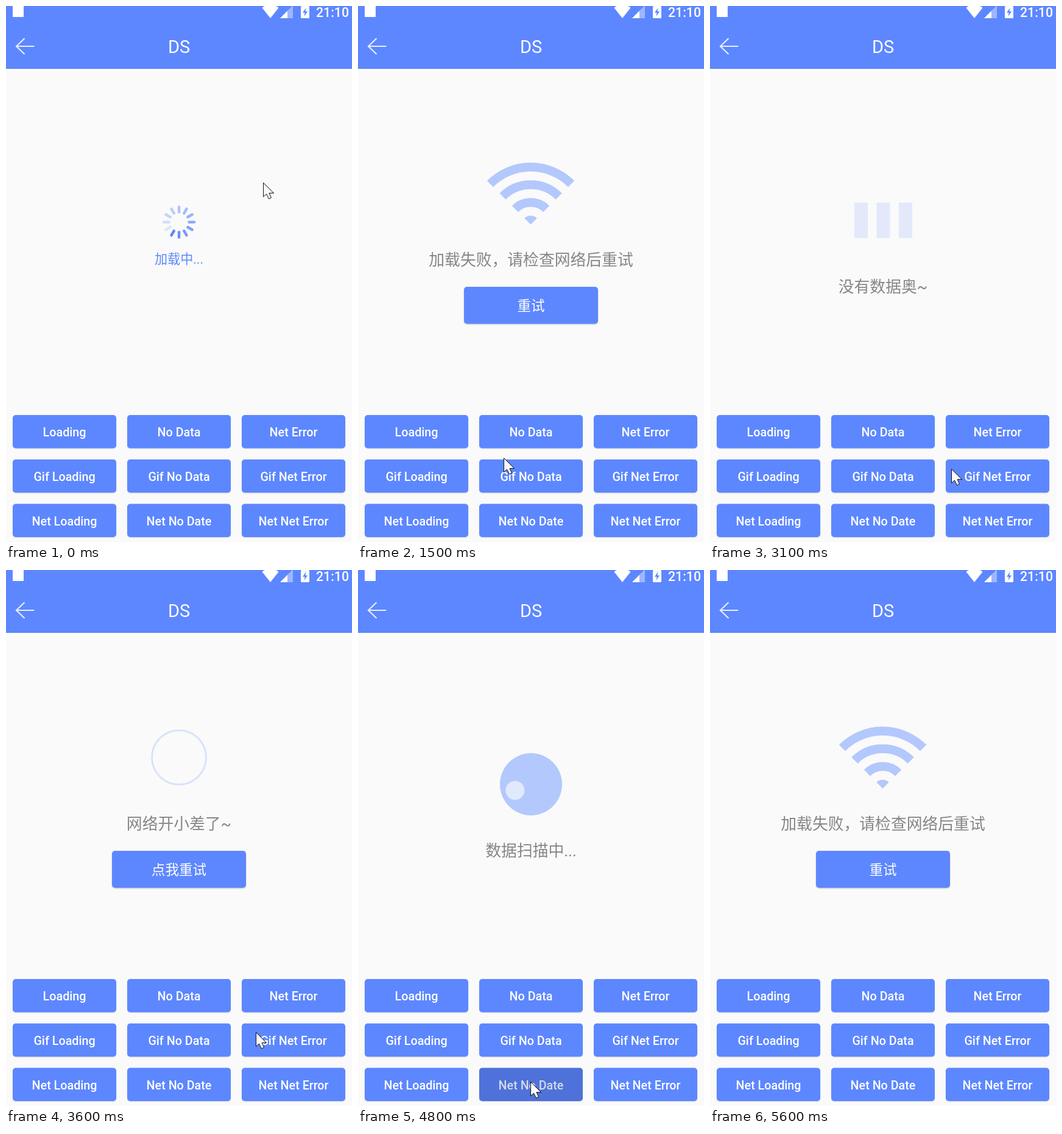
Recreate the animation shown at these times as an HTML page with a canvas. Size 568 by 878 pixels, loop 7300 ms.

```html
<!DOCTYPE html>
<html lang="zh">
<head>
<meta charset="utf-8">
<title>State screens</title>
<style>
html, body { margin: 0; width: 100%; height: 100%; overflow: hidden; background: #fafafa; }
canvas { display: block; }
</style>
</head>
<body>
<canvas id="stage" width="568" height="878"></canvas>
<script>
const ctx = document.getElementById('stage').getContext('2d');
const W = 568, H = 878, CX = 284;
const LOOP = 7300, STEP = 100, LAST = 5600;
const HOLD = 200, REST = 300;
const BLUE = '#5d87ff', PALE = '#b3c8fc', GREY = '#868686', BACK = '#fafafa';
const FONT = 'Roboto, "Noto Sans CJK SC", "Noto Sans CJK", sans-serif';
const TAU = Math.PI * 2;

// One scene per button: press time, pointer position, screen it opens.
const scenes = [
  { label: 'Loading', at: -REST, x: 422, y: 289, show: loading },
  { label: 'No Data', at: 400, x: 312, y: 703, show: noData },
  { label: 'Net Error', at: 1000, x: 414, y: 686, show: netError },
  { label: 'Gif Loading', at: 1900, x: 166, y: 763, show: () => message('拼命加载中...') },
  { label: 'Gif No Data', at: 2600, x: 298, y: 766, show: gifNoData },
  { label: 'Gif Net Error', at: 3300, x: 410, y: 757, show: gifNetError },
  { label: 'Net Loading', at: 4100, x: 152, y: 851, show: scanning },
  { label: 'Net No Date', at: 4800, x: 283, y: 838, show: noData },
  { label: 'Net Net Error', at: 5400, x: 455, y: 838, show: netError }
];

function trace(...points) {
  ctx.beginPath();
  points.forEach(([x, y]) => ctx.lineTo(x, y));
}

function poly(fill, ...points) {
  trace(...points);
  ctx.closePath();
  ctx.fillStyle = fill;
  ctx.fill();
}

function disc(x, y, r, fill) {
  ctx.beginPath();
  ctx.arc(x, y, r, 0, TAU);
  ctx.fillStyle = fill;
  ctx.fill();
}

function text(str, x, y, size, fill, weight = 400) {
  ctx.font = `${weight} ${size}px ${FONT}`;
  ctx.textAlign = 'center';
  ctx.fillStyle = fill;
  ctx.fillText(str, x, y);
}

function button(x, y, w, h, fill, shade) {
  ctx.save();
  ctx.shadowColor = `rgba(0,0,0,${shade})`;
  ctx.shadowBlur = 2;
  ctx.shadowOffsetY = 1;
  ctx.beginPath();
  ctx.roundRect(x, y, w, h, 5);
  ctx.fillStyle = fill;
  ctx.fill();
  ctx.restore();
}

function header() {
  ctx.fillStyle = BLUE;
  ctx.fillRect(0, 0, W, 103);
  ctx.fillStyle = '#fff';
  ctx.fillRect(11, 0, 18, 18);

  ctx.beginPath();
  ctx.moveTo(434, 20);
  ctx.lineTo(420.5, 3);
  ctx.quadraticCurveTo(434, -8, 447.5, 3);
  ctx.fill();

  poly('rgba(255,255,255,.4)', [450, 20], [471, 20], [471, -1]);
  poly('#fff', [450, 20], [462, 20], [462, 8]);

  ctx.beginPath();
  ctx.roundRect(484, 0, 14, 20, 1.5);
  ctx.fill();
  poly(BLUE, [492.5, 3], [487, 11], [490.5, 11], [489.5, 17], [495, 9], [491.5, 9]);
  text('21:10', 536, 18, 21.3, '#fff', 500);

  ctx.strokeStyle = '#e4ecff';
  ctx.lineWidth = 2.2;
  trace([30.5, 53], [17, 66], [30.5, 79]);
  ctx.moveTo(17, 66);
  ctx.lineTo(46.5, 66);
  ctx.stroke();
  text('DS', CX, 77, 29, '#fff');
}

function buttons(t) {
  scenes.forEach(({ label, at }, i) => {
    const x = 11 + (i % 3) * 188, y = 670 + Math.floor(i / 3) * 72.8;
    const down = t >= at && t < at + HOLD;
    button(x, y, 170, 54.4, down ? '#4e72d9' : BLUE, 0.12);
    text(label, x + 85, y + 35, 19.7, down ? '#d5daea' : '#fff', 500);
  });
}

function message(str, y = 469) {
  text(str, CX, y, 25.8, GREY);
}

function retry(str) {
  button(174, 460, 220, 60.5, BLUE, 0.25);
  text(str, CX, 499, 22.6, '#fff');
}

function loading(t) {
  const head = 7 + t / STEP;
  ctx.lineWidth = 4.4;
  ctx.lineCap = 'round';
  ctx.strokeStyle = BLUE;
  for (let i = 0; i < 12; i++) {
    const a = (head - i) * TAU / 12 - TAU / 4;
    const spoke = r => [CX + r * Math.cos(a), 354 + r * Math.sin(a)];
    ctx.globalAlpha = 1 - i * 0.075;
    trace(spoke(16.5), spoke(25));
    ctx.stroke();
  }
  ctx.globalAlpha = 1;
  ctx.lineCap = 'butt';
  text('加载中...', CX, 422, 21.1, BLUE);
}

function noData() {
  const l = 231.5, r = 335.5, top = 283.5, bottom = 419.5, k = 7;
  ctx.beginPath();
  ctx.moveTo(l + k, top);
  ctx.lineTo(303, top);
  ctx.lineTo(r, 317);
  ctx.arcTo(r, bottom, l, bottom, k);
  ctx.arcTo(l, bottom, l, top, k);
  ctx.arcTo(l, top, r, top, k);
  ctx.fillStyle = PALE;
  ctx.fill();
  message('暂无数据');
}

function netError() {
  const x = 283.5, y = 358, band = 14.4;
  ctx.strokeStyle = PALE;
  ctx.lineWidth = band;
  for (let i = 0; i < 4; i++) {
    ctx.beginPath();
    ctx.arc(x, y, band / 2 + i * 29, -TAU * 3 / 8, -TAU / 8);
    ctx.stroke();
  }
  message('加载失败，请检查网络后重试', 425);
  retry('重试');
}

function gifNoData(t) {
  ctx.fillStyle = BLUE;
  for (let i = 0; i < 3; i++) {
    const pulse = Math.max(0, 1 - Math.abs(t - 2800 - i * 50) / 200);
    const h = 58 + 16 * pulse;
    ctx.globalAlpha = 0.15 + 0.3 * pulse;
    ctx.fillRect(237 + i * 36.5, 351 - h / 2, 22, h);
  }
  ctx.globalAlpha = 1;
  message('没有数据奥~');
}

function gifNetError(t) {
  const p = (t + 200) % 1000 / 1000;
  ctx.globalAlpha = 1 - p * 0.7;
  ctx.strokeStyle = '#a9c2fc';
  ctx.lineWidth = 2.8;
  ctx.beginPath();
  ctx.arc(CX, 307, 47 * (1 - Math.pow(1 - p, 1.8)), 0, TAU);
  ctx.stroke();
  ctx.globalAlpha = 1;
  message('网络开小差了~', 425);
  retry('点我重试');
}

function scanning(t) {
  const a = TAU * (159 / 360 + (t - 4800) / 1000);
  disc(CX, 351, 51, PALE);
  disc(CX + 28 * Math.cos(a), 351 + 28 * Math.sin(a), 15.5, '#e1e9fd');
  message('数据扫描中...');
}

// Rests after each press, then glides to the next with an ease-out.
function pointer(t) {
  const next = scenes.findIndex(s => s.at > t);
  const to = scenes[next < 0 ? scenes.length - 1 : next];
  const from = scenes[next < 0 ? scenes.length - 1 : next - 1];
  const leave = from.at + REST;
  const p = t <= leave ? 0 : (t - leave) / (to.at - leave);
  const e = 1 - Math.pow(1 - p, 3);
  ctx.save();
  ctx.translate(
    Math.round(from.x + (to.x - from.x) * e) + 0.5,
    Math.round(from.y + (to.y - from.y) * e) + 0.5
  );
  poly(BACK, [0, 0], [0, 23], [5, 18.5], [9, 26.5], [13, 24.5], [9.5, 17], [17, 17]);
  ctx.strokeStyle = '#111';
  ctx.lineWidth = 1;
  ctx.stroke();
  ctx.restore();
}

function draw(t) {
  ctx.fillStyle = BACK;
  ctx.fillRect(0, 0, W, H);
  header();
  buttons(t);
  scenes.filter(s => t >= s.at + HOLD).pop().show(t);
  if (t < LAST) pointer(t);
}

const start = performance.now();
function tick() {
  const t = (performance.now() - start) % LOOP;
  draw(Math.min(LAST, Math.floor(t / STEP) * STEP));
  requestAnimationFrame(tick);
}
tick();
</script>
</body>
</html>
```
